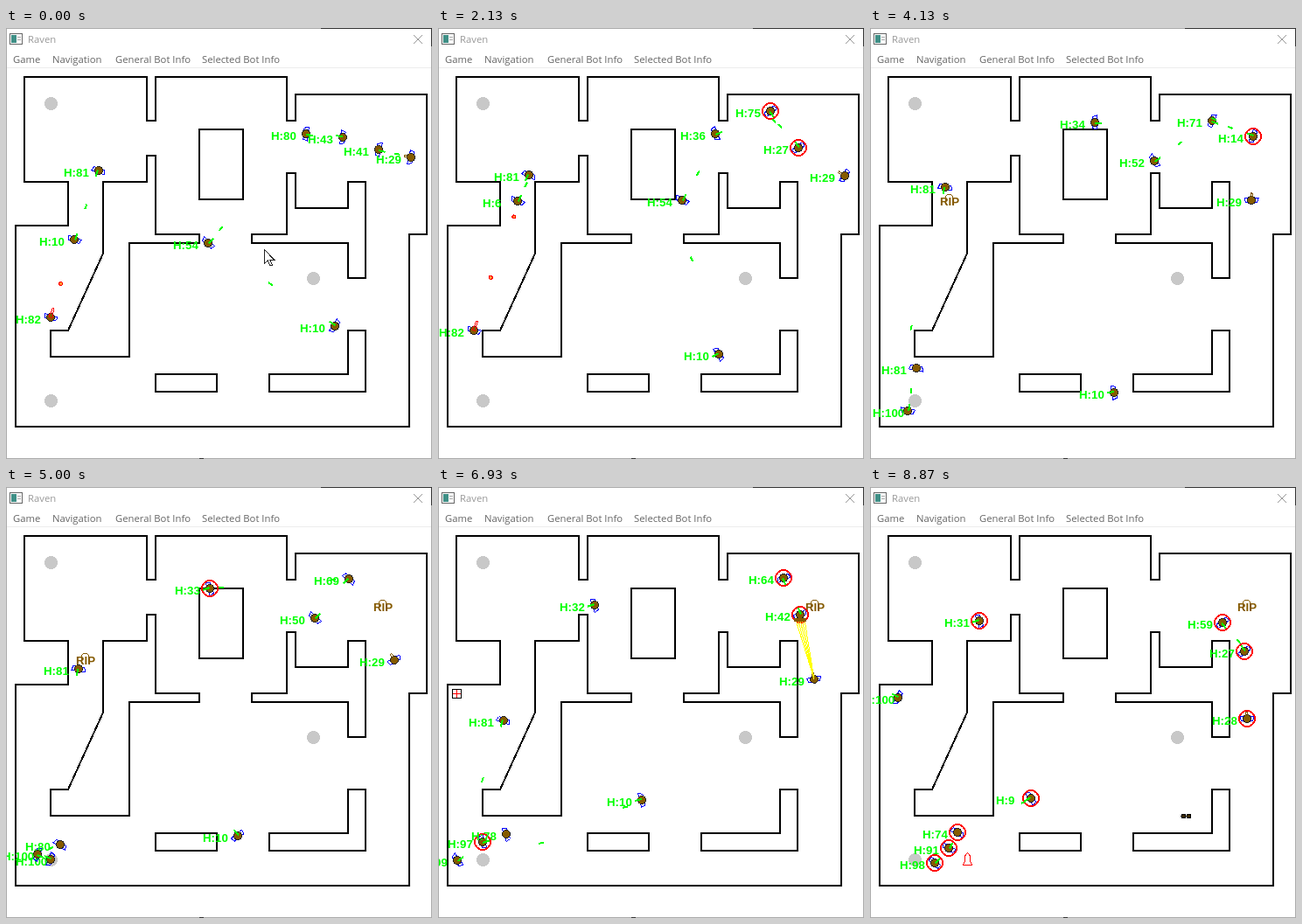
Animation of 487x493 px, one loop 8940 ms. Source, as an HTML page:

```html
<!DOCTYPE html>
<html lang="en">
<head>
<meta charset="utf-8">
<title>Raven</title>
<style>
  html, body { margin: 0; width: 100%; height: 100%; overflow: hidden; background: #fff; }
  svg { display: block; }
  .ui { font: 11.3px "Open Sans", "Noto Sans", sans-serif; fill: #666; }
  .tag { font: bold 13.3px "Liberation Sans", Arial, sans-serif; }
  .line { fill: none; stroke-width: 1; }
  #client { shape-rendering: crispEdges; }
  #walls { fill: none; stroke: #000; stroke-width: 2; stroke-linejoin: round; }
</style>
</head>
<body>
<svg width="487" height="493" viewBox="0 0 487 493">
  <defs><clipPath id="area"><rect x="1" y="46" width="485" height="446"/></clipPath></defs>
  <rect width="487" height="493" fill="#fff"/>
  <path class="line" d="M.5 0V493M486.5 0V493M0 .5H487M0 492.5H487" stroke="#aaa"/>
  <path class="line" d="M360 .5H487M486.5 0V21M221 492.5H226" stroke="#333"/>
  <path class="line" d="M1 45.5H486" stroke="#ececec"/>
  <rect x="4.5" y="6.5" width="14" height="12" fill="#fff" stroke="#666"/>
  <rect x="6" y="8" width="6" height="9" fill="#3f8f86"/>
  <path class="line" d="M13 10.5H17M13 13.5H17" stroke="#aaa"/>
  <path class="line" d="M466 8L476 18M476 8L466 18" stroke="#999"/>
  <g class="ui">
    <text x="25" y="17" fill="#999" style="fill:#999">Raven</text>
    <text x="8" y="40">Game</text>
    <text x="53" y="40">Navigation</text>
    <text x="125" y="40">General Bot Info</text>
    <text x="224" y="40">Selected Bot Info</text>
  </g>
  <g id="client" clip-path="url(#area)">
    <g id="walls">
      <polygon points="11,456 11,226 71,226 71,176 21,176 21,56 161,56 161,106 171,106 171,56 321,56 321,106 331,106 331,76 481,76 481,236 461,236 461,456"/>
      <polygon points="171,236 171,146 161,146 161,176 111,176 111,258 71,346 51,346 51,376 141,376 141,246 221,246 221,236"/>
      <polygon points="281,236 321,236 321,166 331,166 331,206 391,206 391,176 411,176 411,286 391,286 391,246 281,246"/>
      <polygon points="221,116 271,116 271,196 221,196"/>
      <polygon points="171,396 241,396 241,416 171,416"/>
      <polygon points="301,396 391,396 391,346 411,346 411,416 301,416"/>
    </g>
    <g fill="#c8c8c8">
      <circle cx="51.5" cy="86.5" r="7.5"/>
      <circle cx="351.5" cy="286.5" r="7.5"/>
      <circle cx="51.5" cy="426.5" r="7.5"/>
    </g>
    <g id="health">
      <rect class="line" x="16.5" y="231.5" width="10" height="10" stroke="#000"/>
      <path class="line" d="M17 236.5H26M21.5 232V241" stroke="#f00"/>
    </g>
    <g id="shells" fill="#3a2800" stroke="#000">
      <circle cx="358.5" cy="376.5" r="2.5"/><circle cx="364.5" cy="376.5" r="2.5"/>
    </g>
    <path id="launcher" class="line" stroke="#f00" d="M111.5 418.5L108.5 422V428L106.5 432H116.5L114.5 428V422Z"/>
    <g id="graves"></g>
    <g id="bots"></g>
    <path id="pellets" class="line" stroke="#ff0"/>
    <path id="dents" fill="#855a00"/>
    <path id="bolts" fill="none" stroke="#0f0" stroke-width="2"/>
    <path id="rockets" fill="#f93" stroke="#f00"/>
    <path id="cursor" d="M.5 .5V16.5L4.2 13L7 19L9.5 18L6.8 12H11.5Z" fill="#fff" stroke="#222"/>
  </g>
</svg>
<script>
const LOOP = 8940, END = 133, RANGE = 200, GRAVE_STEPS = 60;
const BLASTER = { period: 10, speed: 11 }, LAUNCHER = { period: 10, speed: 6.7 };
const $ = id => document.getElementById(id);
const lerp = (a, b, f) => a + (b - a) * f;
const dist = (a, b) => Math.hypot(b.x - a.x, b.y - a.y);
const bearing = (a, b) => Math.atan2(b.y - a.y, b.x - a.x);
const show = (el, on) => el.setAttribute('visibility', on ? 'visible' : 'hidden');
const bots = [], graves = [];

function make(tag, attrs, parent) {
  const el = document.createElementNS('http://www.w3.org/2000/svg', tag);
  for (const k in attrs) el.setAttribute(k, attrs[k]);
  return parent.appendChild(el);
}

// Point on a list of [step, x, y] waypoints
function along(path, s) {
  const i = Math.max(1, path.findIndex(p => p[0] > s));
  const late = s >= path[path.length - 1][0];
  const [a, b] = late ? [path[path.length - 1], path[path.length - 1]] : [path[i - 1], path[i]];
  const f = late ? 0 : Math.max(0, (s - a[0]) / (b[0] - a[0]));
  return { x: lerp(a[1], b[1], f), y: lerp(a[2], b[2], f) };
}

// A life has a path and a health that falls from hp[0] to hp[1] as time ** curve.
function addBot(gun, ...lives) {
  const root = make('g', {}, $('bots'));
  const body = make('g', {}, root);
  make('path', { d: 'M-2.5 6.5L2.5 8V-8L-2.5 -6.5Z', class: 'line', stroke: '#00f' }, body);
  make('circle', { r: 4.6, fill: '#855a00', stroke: '#222' }, body);
  const barrel = make('path', gun === 'shotgun' ? { d: 'M0 -1H8V1H0Z', fill: 'none', stroke: '#855a00' }
    : gun === 'rocket' ? { d: 'M0 -2H4V-1H11V1H4V2H0Z', fill: 'none', stroke: '#f00' }
    : { d: 'M0 1H8', stroke: '#0f0', 'stroke-width': 2 }, body);
  const ring = make('circle', { r: 9, fill: 'none', stroke: '#f00', 'stroke-width': 2 }, root);
  const label = make('text', { x: -40, y: 6.5, class: 'tag', fill: '#0f0' }, root);
  bots.push({ gun, lives, root, body, barrel, ring, label });
  for (const life of lives) if (life.dies) addGrave(...life.path[life.path.length - 1]);
}

function addGrave(step, x, y) {
  const el = make('g', { transform: `translate(${x} ${y - 1})` }, $('graves'));
  make('path', { d: 'M-4.5 5.5V-2.5Q-4 -5.5 -.5 -5.5Q3 -5.5 3.5 -2.5V5.5', class: 'line', stroke: '#855a00' }, el);
  make('text', { x: -11, y: 7, class: 'tag', fill: '#855a00' }, el).textContent = 'RIP';
  graves.push({ el, step });
}

addBot('blaster', { hp: [80, 59], path: [[0, 343, 121], [18, 362, 94], [45, 397, 96], [62, 391, 106], [104, 395, 104], [END, 403, 155]] });
addBot('blaster', { hp: [43, 31], curve: 0.3, path: [[0, 385, 125], [45, 290, 120], [62, 257, 108], [END, 125, 153]] });
addBot('blaster',
  { hp: [41, 8], dies: true, path: [[0, 426, 139], [18, 410, 150], [45, 414, 125], [62, 438, 124], [75, 431, 136]] },
  { hp: [100, 91], curve: 1.5, path: [[75, 51, 426], [87, 47, 427], [104, 51, 406], [END, 90, 413]] });
addBot('shotgun', { hp: [29, 28], curve: 0.3, path: [[0, 463, 148], [45, 466, 178], [62, 436, 197], [87, 452, 199], [104, 430, 220], [END, 431, 265]] });
addBot('blaster',
  { hp: [81, 80], curve: 0.1, path: [[0, 106, 163], [18, 121, 164], [45, 89, 171], [62, 86, 182], [104, 75, 267], [130, 36, 243]] },
  { hp: [100, 100], path: [[130, 36, 243], [END, 32, 241]] });
addBot('blaster',
  { hp: [10, 5], dies: true, path: [[0, 78, 242], [18, 90, 207], [33, 91, 197]] },
  { hp: [100, 98], path: [[33, 51, 426], [62, 43, 438], [87, 30, 403], [104, 22, 427], [END, 74, 430]] });
addBot('rocket', { hp: [82, 74], curve: 2, path: [[0, 51, 331], [18, 42, 328], [45, 41, 363], [87, 70, 428], [104, 78, 397], [END, 100, 395]] });
addBot('blaster', { hp: [54, 27], curve: 3, path: [[0, 231, 246], [45, 299, 177], [62, 325, 152], [104, 414, 146], [END, 428, 188]] });
addBot('blaster', { hp: [10, 9], curve: 0.1, path: [[0, 376, 341], [45, 299, 386], [62, 279, 417], [104, 233, 358], [END, 184, 356]] });

const pointer = [[36, 150, 465], [43, 21, 65], [54, 21, 65], [60, -15, 50]];

const walls = [...document.querySelectorAll('#walls polygon')].flatMap(({ points }) => {
  const p = [...points];
  return p.map((a, i) => [a, p[(i + 1) % p.length]]);
});
const side = (a, b, c) => Math.sign((b.x - a.x) * (c.y - a.y) - (b.y - a.y) * (c.x - a.x));
const crosses = (a, b, c, d) => side(a, b, c) !== side(a, b, d) && side(c, d, a) !== side(c, d, b);
const sees = (a, b) => dist(a, b) < RANGE && !walls.some(([c, d]) => crosses(a, b, c, d));

const lifeAt = (bot, s) => bot.lives.filter(l => l.path[0][0] <= s).pop() || bot.lives[0];
const place = (bot, s) => along(lifeAt(bot, s).path, s);

function health({ hp, curve = 1, path }, s) {
  const from = path[0][0], to = path[path.length - 1][0];
  const f = Math.min(1, Math.max(0, (s - from) / (to - from)));
  return Math.ceil(lerp(hp[0], hp[1], f ** curve));
}

// Nearest bot in plain sight
function findTarget(bot, s) {
  const me = place(bot, s);
  return bots.filter(o => o !== bot).map(o => place(o, s))
    .filter(p => sees(me, p))
    .sort((a, b) => dist(me, a) - dist(me, b))[0];
}

function facing(bot, s) {
  const target = findTarget(bot, s), { path } = lifeAt(bot, s);
  return target ? bearing(place(bot, s), target) : bearing(along(path, s - 2), along(path, s + 2));
}

const hasRockets = (bot, s) => bot.gun === 'rocket' && s < 50;

const shots = bots.flatMap((bot, i) => {
  const list = [];
  if (bot.gun === 'shotgun') return list;
  for (let s = i * 4 % BLASTER.period - BLASTER.period; s < END; s++) {
    const gun = hasRockets(bot, s) ? LAUNCHER : BLASTER;
    if ((s - i * 4) % gun.period) continue;
    const a = place(bot, s), b = findTarget(bot, s);
    if (b) list.push({ gun, ...a, angle: bearing(a, b), from: s, to: s + dist(a, b) / gun.speed });
  }
  return list;
});

function fly(gun, s, draw) {
  return shots.filter(o => o.gun === gun && s > o.from && s <= o.to).map(o => {
    const c = Math.cos(o.angle), n = Math.sin(o.angle), d = (s - o.from) * gun.speed;
    return draw(o.x + c * d, o.y + n * d, c, n);
  }).join('');
}
const dot = (x, y, r) => `M${x - r} ${y}a${r} ${r} 0 1 0 ${2 * r} 0a${r} ${r} 0 1 0 ${-2 * r} 0`;

function drawShotgun(s) {
  const bot = bots.find(o => o.gun === 'shotgun'), beat = s % 16;
  const target = (beat === 8 || beat === 9) && findTarget(bot, s);
  let rays = '', ends = '';
  if (target) {
    const a = place(bot, s);
    for (let i = -2; i <= 2; i++) {
      const x = target.x + i * 2.5, y = target.y + 6;
      rays += `M${a.x} ${a.y}L${x} ${y}`;
      ends += dot(x, y, 2.5);
    }
  }
  $('pellets').setAttribute('d', rays);
  $('dents').setAttribute('d', ends);
}

function drawBot(bot, s) {
  const life = lifeAt(bot, s), p = along(life.path, s), hp = health(life, s);
  bot.root.setAttribute('transform', `translate(${Math.round(p.x)} ${Math.round(p.y)})`);
  bot.body.setAttribute('transform', `rotate(${facing(bot, s) * 180 / Math.PI})`);
  bot.label.textContent = 'H:' + hp;
  show(bot.ring, hp < health(life, s - 3));
  if (bot.gun === 'rocket') show(bot.barrel, hasRockets(bot, s));
}

function render(ms) {
  const s = Math.floor(ms * 0.015 + 0.06);
  bots.forEach(bot => drawBot(bot, s));
  graves.forEach(g => show(g.el, s >= g.step && s < g.step + GRAVE_STEPS));
  show($('health'), s >= 96 && s < 130);
  show($('shells'), s >= 118);
  show($('launcher'), s >= 124);
  drawShotgun(s);
  $('bolts').setAttribute('d', fly(BLASTER, s,
    (x, y, c, n) => `M${x - c * 3} ${y - n * 3}L${x + c * 3} ${y + n * 3}`));
  $('rockets').setAttribute('d', fly(LAUNCHER, s, (x, y) => dot(x, y, 2)));
  const m = s < 8 ? { x: 295, y: 253 } : along(pointer, s);
  $('cursor').setAttribute('transform', `translate(${m.x} ${m.y})`);
  show($('cursor'), s < 8 || s >= 36);
}

const start = performance.now();
function tick() {
  render((performance.now() - start) % LOOP);
  requestAnimationFrame(tick);
}
render(0);
requestAnimationFrame(tick);
</script>
</body>
</html>
```
